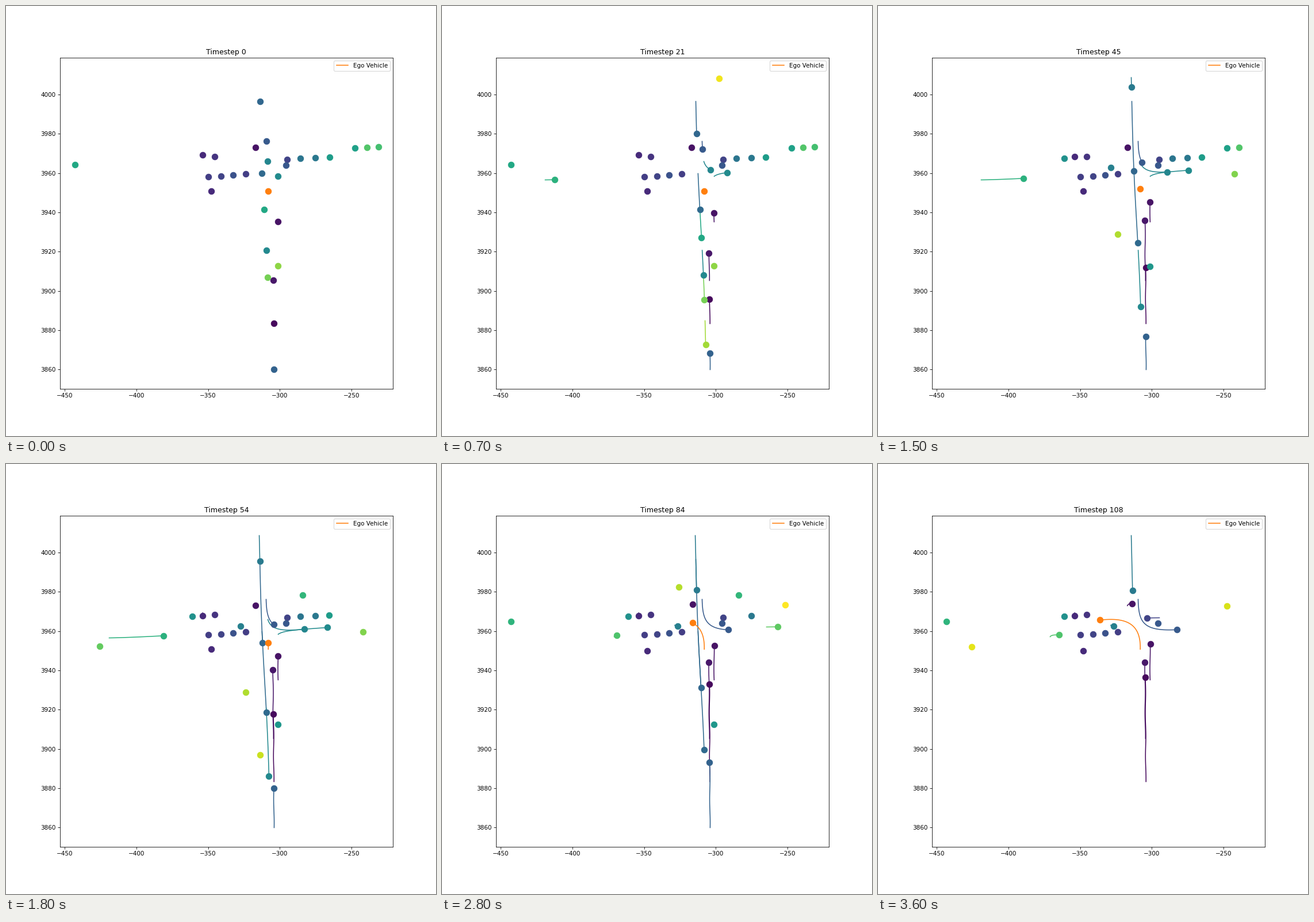
Animation of 748x748 px, one loop 3.7 s. Source, as a matplotlib script:

```python
from math import comb

import numpy as np
import matplotlib.pyplot as plt
from matplotlib.animation import FuncAnimation

SIZE = 748
FRAMES, STRIDE = 37, 3
END = (FRAMES - 1) * STRIDE
XLIM, YLIM = (-453.5, -221.0), (3850.25, 4018.85)
EGO = "#ff7f0e"

fig, ax = plt.subplots(figsize=(10, 10), dpi=SIZE / 10)
fig.subplots_adjust(left=0.125, right=0.9, bottom=0.11, top=0.88)
ax.set(xlim=XLIM, ylim=YLIM)
title = ax.set_title("Timestep 0")
vehicles = []


def to_data(x, y):
    """Stage pixel (y down) to axis units."""
    u = ((x + 0.5) / SIZE - 0.125) / 0.775
    v = (0.89 - (y + 0.5) / SIZE) / 0.77
    return XLIM[0] + u * np.ptp(XLIM), YLIM[0] + v * np.ptp(YLIM)


def pace(u, v0, v1):
    """Progress 0..1 with speeds v0 and v1 at the ends, 1 being average."""
    return u + (v0 - 1) * u * (1 - u) ** 2 - (v1 - 1) * u * u * (1 - u)


def bezier(*points):
    u = np.linspace(0, 1, 200)
    n = len(points) - 1
    weights = [comb(n, k) * u ** k * (1 - u) ** (n - k) for k in range(n + 1)]
    return np.array(points, float).T @ weights


def southbound(y0, y1):
    y = np.linspace(y0, y1, 200)
    return 441 + 0.04 * (y - 165) - 1.2 * np.sin((y - 165) / 68.4), y


def northbound(y0, y1, shift=0):
    y = np.linspace(y0, y1, 200)
    return 464.6 + 0.004 * (y - 365) + 0.4 * np.sin(y / 12) + shift, y


def drive(tone, path, first=0, last=END, v0=1, v1=1, go=None, stop=None):
    """Follow a path, visible from first to last, moving from go to stop."""
    go = first if go is None else go
    stop = last if stop is None else stop
    steps = np.arange(first, last + 1)
    x, y = path
    length = np.append(0, np.cumsum(np.hypot(np.diff(x), np.diff(y))))
    s = length[-1] * pace(np.clip((steps - go) / (stop - go), 0, 1), v0, v1)
    xs, ys = to_data(np.interp(s, length, x), np.interp(s, length, y))
    color = tone if isinstance(tone, str) else plt.cm.viridis(tone)
    line, = ax.plot([], [], color=color, lw=1.5, zorder=2)
    dot, = ax.plot([], [], "o", color=color, ms=10, mew=1, zorder=3)
    vehicles.append((first, xs, ys, line, dot))
    return line


def park(tone, x, y, first=0, last=END):
    drive(tone, bezier((x, y), (x, y)), first, last)


def queue(tones, start, end, lasts):
    """Evenly spaced parked vehicles."""
    for tone, (x, y), last in zip(tones, np.linspace(start, end, len(tones)), lasts):
        park(tone, x, y, last=last)


# northbound, braking towards the junction
drive(.05, northbound(375, 313, 8.3), stop=100, v1=0)
drive(.06, northbound(477, 345, -.6), stop=70, v1=0)
drive(.02, northbound(552, 370.5), stop=104, v1=0)
drive(.31, northbound(632, 484), last=102, v1=1.48)

# southbound
drive(.33, southbound(165.5, 424.5), last=99, v1=.9)
drive(.34, southbound(291, 525), last=96, v0=1.36)
drive(.6, southbound(354, 452), last=42)
drive(.47, southbound(424.5, 563), last=63, v0=.85)
drive(.79, southbound(472, 522), last=27)
drive(.86, southbound(547, 616), 7, 30)
drive(.41, southbound(124, 219.5), 40, stop=88, v0=1.75, v1=0)

# turning
drive(.46, bezier((455, 270), (460, 286), (474, 293), (530, 285.3)), last=60, v0=.42, v1=1.4)
drive(.48, bezier((473, 295.7), (482, 289), (505, 287.6), (580, 282.5)), last=63, v0=.4, v1=1.4)
drive(.28, bezier((452, 235), (453, 275), (460, 291), (520, 287.7)), v0=.45, v1=.8)

# cross traffic
drive(.64, bezier((179, 302), (215, 301.5), (288, 297.5)), 14, 60)
drive(.75, bezier((564, 283), (635, 282)), 77, 102)
drive(.72, bezier((299, 300), (301, 296), (314.5, 297)), 78, v0=1.9)
drive(.2, bezier((489, 267), (468, 267.3)), go=84)
drive(.05, bezier((433.3, 246), (436, 241), (442, 242.5)), go=60, v0=.3, v1=2)

# creeping
drive(.12, bezier((341.3, 259), (341.3, 263.5)), go=36, stop=54)
drive(.12, bezier((357, 322), (357, 325)), go=69, stop=84)
drive(.43, bezier((404.3, 280), (409.2, 281.7)), 42, stop=66, v1=0)
drive(.65, bezier((121.4, 273.2), (118.4, 273.6)), 60)
drive(.81, bezier((618, 292), (621, 292)), 30, 57)

# waiting in line
park(.15, 362.4, 262)
park(.27, 486.7, 276.7)
queue((.18, .2, .25, .18), (352, 296.7), (416.3, 292), (END,) * 4)
queue((.39, .4, .55), (512, 264.5), (562, 262.7), (78, 96, 63))
queue((.57, .73, .7), (607, 246.5), (648, 244.7), (48, 45, 42))

# short detections
park(.6, 119, 275.5, last=42)
park(.83, 473, 452, last=27)
park(.53, 472.6, 452.3, 45, 96)
park(.98, 481, 126, 18, 24)
park(.88, 417, 397, 30, 60)
park(.5, 323.5, 264.3, 45)
park(.66, 515.5, 227.5, 48, 96)
park(.92, 441.3, 505.3, 48, 78)
park(.76, 162, 317, 51, 57)
park(.89, 411.5, 213.5, 81, 87)
park(1., 597, 245, 81, 87)
park(.94, 606, 247, 105)
park(.96, 162, 317.5, 105)

ego = drive(EGO, bezier((455.7, 321.7), (457, 276), (430, 266), (385.5, 271)),
            go=33, v0=.1, v1=1.7)
ego.set_label("Ego Vehicle")
ax.legend(handles=[ego], loc="upper right")


def update(frame):
    step = frame * STRIDE
    title.set_text(f"Timestep {step}")
    for first, xs, ys, line, dot in vehicles:
        n = step - first + 1
        alive = 0 < n <= len(xs)
        line.set_visible(alive)
        dot.set_visible(alive)
        if alive:
            line.set_data(xs[:n], ys[:n])
            dot.set_data(xs[n - 1:n], ys[n - 1:n])
    return []


anim = FuncAnimation(fig, update, frames=FRAMES, interval=100, repeat=True, repeat_delay=0)
plt.show()
```
